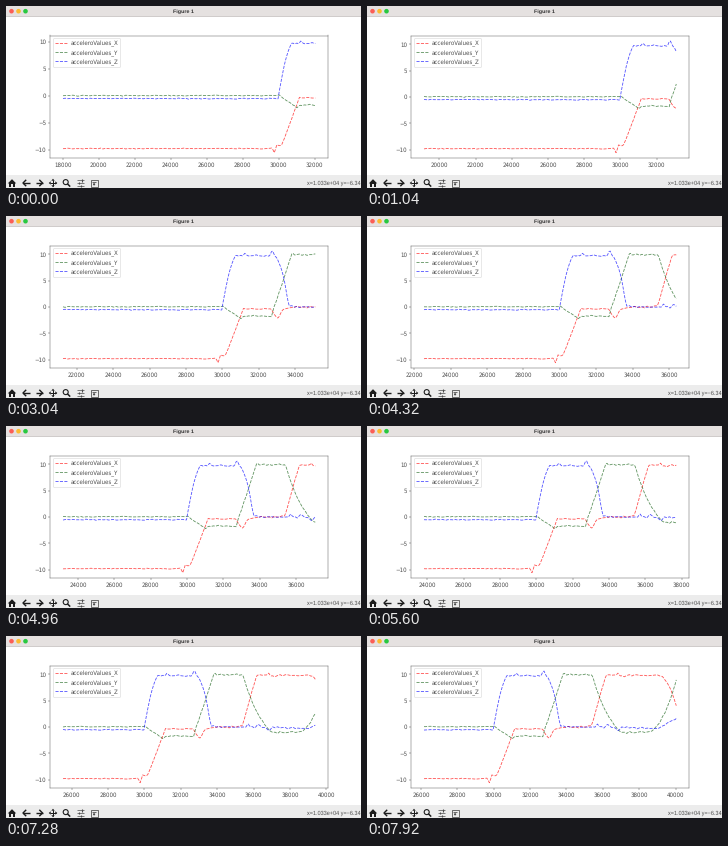
Write a matplotlib script that moves like this. It is 355x182 px and loops after 8 s.

```python
import numpy as np
import matplotlib.pyplot as plt
from matplotlib.animation import FuncAnimation
from matplotlib.patches import Circle, Polygon, Rectangle
from matplotlib.ticker import MultipleLocator

W, H, DPI = 355, 182, 40
FRAMES, STEP = 100, 80
PX = 72 / DPI  # points per pixel
INK, GREY = "#1c1c1c", "#4d4d4d"
plt.rcParams.update({
    "text.hinting": "none", "font.family": "DejaVu Sans",
    "axes.edgecolor": GREY, "xtick.color": GREY, "ytick.color": GREY,
    "legend.labelcolor": GREY,
})

# Sensor readings as functions of t in seconds


def linear(u):
    return u


def ease_in(u):
    return u ** 2


def ease_out(u):
    return 1 - (1 - u) ** 1.7


def ramp(t, begin, end, change, ease=linear):
    return change * ease(np.clip((t - begin) / (end - begin), 0, 1))


def bump(t, centre, half_width, height):
    return height * np.clip(1 - abs(t - centre) / half_width, 0, None)


def accel_x(t):
    return (-9.8 + bump(t, 29.77, .12, -.8) + ramp(t, 29.78, 29.9, .6)
            + ramp(t, 30.16, 31.15, 8.8) + bump(t, 33.02, .35, -1.8)
            + ramp(t, 33.4, 34, .4) + ramp(t, 35.37, 36.17, 9.8)
            + bump(t, 36.84, .1, .5) + ramp(t, 39.05, 40.06, -6, ease_in))


def accel_y(t):
    return (.05 + ramp(t, 30.05, 30.8, -1.8) + bump(t, 31, .25, -.5)
            + ramp(t, 32.7, 33.8, 11.65) + bump(t, 33.89, .1, .3)
            + ramp(t, 35.4, 37.1, -10.9, ease_out)
            + ramp(t, 38.4, 40.06, 10.2, ease_in))


def accel_z(t):
    return (-.5 + ramp(t, 29.97, 30.8, 10.25, ease_out) + bump(t, 31.22, .13, .5)
            + bump(t, 32.74, .14, 1.15) + ramp(t, 32.8, 33.66, -9.7, ease_in)
            + bump(t, 35.69, .12, .7) + bump(t, 36.28, .2, .5)
            + bump(t, 36.85, .2, -.7) + ramp(t, 37, 38, -.3)
            + ramp(t, 39.1, 40.06, 1.9))


def sample(reading, rng):
    t = np.arange(18000, 40300, 70)
    knots = t[::2]
    jitter = rng.normal(0, 1, len(knots)) * np.where(knots < 29900, .04, .1)
    return t, reading(t / 1000) + np.interp(t, knots, jitter)


fig = plt.figure(figsize=(W / DPI, H / DPI), dpi=DPI, facecolor="white")
chrome = fig.add_axes([0, 0, 1, 1], xlim=(0, W), ylim=(H, 0))
chrome.axis("off")


def box(x, y, w, h, color):
    chrome.add_patch(Rectangle((x, y), w, h, fc=color, lw=0))


def shape(points):
    chrome.add_patch(Polygon(points, fc=INK, lw=0))


def disc(x, y, r, color):
    chrome.add_patch(Circle((x, y), r, fc=color, lw=0))


def stroke(xs, ys, width=1.0, color=INK):
    chrome.plot(xs, ys, color=color, lw=width * PX, solid_capstyle="butt")


def label(x, y, text, size, **style):
    chrome.text(x, y, text, fontsize=size * PX, family="Liberation Sans",
                va="center_baseline", **style)


def draw_title_bar():
    box(0, 0, W, 10.5, "#e5e1e0")
    box(0, 10.2, W, .6, "#d0cccb")
    for i, color in enumerate(("#fb5f57", "#fcbc2f", "#29c840")):
        disc(5.5 + 7 * i, 5.2, 2.3, color)
    label(177.5, 5.2, "Figure 1", 5.4, weight="bold", ha="center", color="#333333")


def draw_toolbar():
    box(0, 169, W, 13, "#ececec")
    y = 177
    # home
    shape([(1.8, y + .4), (6, y - 3.8), (10.2, y + .4)])
    box(3, y, 2.1, 3.6, INK)
    box(6.9, y, 2.1, 3.6, INK)
    box(3, y, 6, 1.2, INK)
    # back and forward
    for x, d in ((20, 1), (33.5, -1)):
        stroke([x - 3 * d, x + 3.7 * d], [y, y], 1.4)
        stroke([x + .2 * d, x - 3 * d, x + .2 * d], [y - 3.2, y, y + 3.2], 1.4)
    # pan
    x = 47
    stroke([x - 3, x + 3], [y, y])
    stroke([x, x], [y - 3, y + 3])
    for dx, dy in ((1, 0), (-1, 0), (0, 1), (0, -1)):
        shape([(x + 4.3 * dx, y + 4.3 * dy),
               (x + 2.3 * dx + 1.7 * dy, y + 2.3 * dy + 1.7 * dx),
               (x + 2.3 * dx - 1.7 * dy, y + 2.3 * dy - 1.7 * dx)])
    # zoom
    chrome.add_patch(Circle((59.7, y - .9), 2.5, fill=False, ec=INK, lw=1.1 * PX))
    stroke([61.4, 64.2], [y + .8, y + 3.6], 1.5)
    # sliders
    for dy, knob in ((-2.6, 76), (0, 72.6), (2.6, 75.4)):
        stroke([70.6, 78.4], [y + dy] * 2, .7, GREY)
        stroke([knob] * 2, [y + dy - 1.1, y + dy + 1.1], 1.1, GREY)
    # save
    chrome.add_patch(Rectangle((84.6, y - 3.4), 7, 6.9, fill=False, ec=GREY, lw=.8 * PX))
    stroke([86, 90], [y - 1.2] * 2, .8, GREY)
    disc(88.1, y + 1.3, 1.1, GREY)
    label(301, 177, "x=1.033e+04 y=\u22126.34", 5.55, ha="left", color=GREY)


draw_title_bar()
draw_toolbar()

LEFT, RIGHT, TOP, BOTTOM = 44.4, 321.9, 29.5, 152.3
ax = fig.add_axes([LEFT / W, 1 - BOTTOM / H, (RIGHT - LEFT) / W, (BOTTOM - TOP) / H])
ax.xaxis.set_major_locator(MultipleLocator(2000))
ax.yaxis.set_major_locator(MultipleLocator(5))

rng = np.random.default_rng(4)
traces = []
for name, color, reading in (("X", "red", accel_x), ("Y", "#146014", accel_y),
                             ("Z", "blue", accel_z)):
    line, = ax.plot([], [], "--", color=color, alpha=.68,
                    label=f"acceleroValues_{name}")
    traces.append((line, *sample(reading, rng)))
ax.legend(loc="upper left", labelspacing=.55, handletextpad=.7)


def padded(lo, hi):
    pad = .05 * (hi - lo)
    return lo - pad, hi + pad


def update(frame):
    now = frame * STEP
    end = 32040 + 1.01 * now
    start = end - np.interp(now, [0, 2000], [14020, 13870])
    low, high = np.inf, -np.inf
    for line, t, v in traces:
        x = np.r_[start, t[(t > start) & (t < end)], end]
        y = np.interp(x, t, v)
        line.set_data(x, y)
        low, high = min(low, y.min()), max(high, y.max())
    ax.set_xlim(padded(start, end))
    ax.set_ylim(padded(low, high))
    return [trace[0] for trace in traces]


anim = FuncAnimation(fig, update, frames=FRAMES, interval=STEP,
                     repeat=True, repeat_delay=0, blit=False)
plt.show()
```
